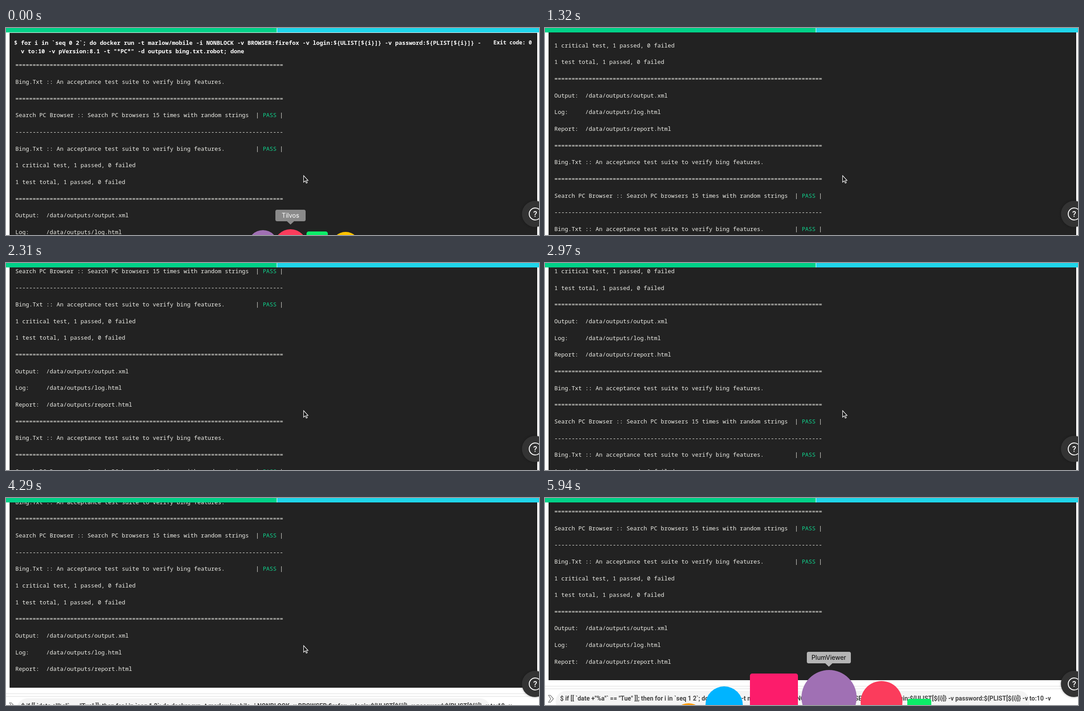
An HTML page with a canvas for the animation above (6.27 s loop, 1199x467 px).

```html
<!DOCTYPE html>
<html lang="en">
<head>
<meta charset="utf-8">
<title>Build log</title>
<style>
html, body { margin: 0; width: 100%; height: 100%; overflow: hidden; background: #fff; }
canvas { display: block; }
</style>
</head>
<body>
<canvas id="stage" width="1199" height="467"></canvas>
<script>
const ctx = document.getElementById('stage').getContext('2d');
const STEP = 330, STEPS = 19, PITCH = 37.66;
const MONO = '"Noto Sans Mono", "DejaVu Sans Mono", monospace';
const SANS = 'Roboto, "Open Sans", sans-serif';
const TIP = 'Inter, "Liberation Sans", sans-serif';

// Page offset at each step; the last value holds
const SCROLL = [0, 20, 101, 167, 270.6, 421, 535, 630.5, 668, 743, 820, 858.5, 930, 1016, 1032.6];

const RULE = '='.repeat(78);
const SUITE = 'Bing.Txt :: An acceptance test suite to verify bing features.';
const PASS = '| PASS |';
const RUN = [
  RULE, SUITE, RULE,
  'Search PC Browser :: Search PC browsers 15 times with random strings'.padEnd(70) + PASS,
  '-'.repeat(78),
  SUITE.padEnd(70) + PASS,
  '1 critical test, 1 passed, 0 failed',
  '1 test total, 1 passed, 0 failed',
  RULE,
  'Output:  /data/outputs/output.xml',
  'Log:     /data/outputs/log.html',
  'Report:  /data/outputs/report.html'
];
const LINES = [...RUN, ...RUN, ...RUN];
const ARGS = 'docker run -t marlow/mobile -i NONBLOCK -v BROWSER:firefox ' +
  '-v login:${ULIST[${i}]} -v password:${PLIST[${i}]} -';

// Dock items: shape, centre x, top, half width, colour
const DOCK_LOW = [
  ['circle', 578, 456, 34, '#a070b4'],
  ['circle', 640, 454, 37, '#fb3c5c'],
  ['square', 700, 459, 24, '#0cec68'],
  ['circle', 764, 460, 32, '#ffc200']
];
const DOCK_HIGH = [
  ['circle', 323, 463, 34, '#ff9d0a'],
  ['circle', 403, 425, 42, '#00b4ff'],
  ['square', 515, 396, 54, '#fc1c6b'],
  ['circle', 639, 388, 62, '#a070b4'],
  ['circle', 757, 413, 47, '#fb3c5c'],
  ['square', 842, 453, 27, '#0cec68']
];

function box(x, y, w, h, color) {
  ctx.fillStyle = color;
  ctx.fillRect(x, y, w, h);
}

function text(str, x, y, font, color, align = 'left') {
  ctx.font = font;
  ctx.fillStyle = color;
  ctx.textAlign = align;
  ctx.fillText(str, x, y);
}

function round(x, y, w, h, r, color) {
  ctx.fillStyle = color;
  ctx.beginPath();
  ctx.roundRect(x, y, w, h, r);
  ctx.fill();
}

function disc(x, y, r, color) {
  ctx.fillStyle = color;
  ctx.beginPath();
  ctx.arc(x, y, r, 0, 7);
  ctx.fill();
}

function page(scroll) {
  const at = y => Math.round(y - scroll);
  box(8, at(11), 1187, 1433, '#222');

  const bold = 'bold 12.885px ' + MONO;
  text('$ for i in `seq 0 2`; do ' + ARGS, 18, at(37.5), bold, '#fff');
  text('v to:10 -v pVersion:8.1 -t "*PC*" -d outputs bing.txt.robot; done', 33.5, at(56.5), bold, '#fff');
  text('Exit code: 0', 1183, at(37), 'bold 12px ' + MONO, '#fff', 'right');

  LINES.forEach((line, i) => {
    const y = at(88.3 + i * PITCH);
    if (y < 0 || y > 485) return;
    const font = '12.885px ' + MONO;
    text(line.replace('PASS', '    '), 21, y, font, '#eeeee8');
    if (line.endsWith(PASS)) text('PASS', 21 + 72 * 7.731, y, font, '#10d28c');
  });

  // Next command, below the log
  box(0, at(1457), 1199, 1, '#ddd');
  box(0, at(1463), 1199, 1, '#ddd');
  round(24, at(1468), 1066, 48, 24, '#f4f4f4');
  text('$ if [[ `date +"%a"` == "Tue" ]]; then for i in `seq 1 2`; do ' + ARGS + 'v to:10 -v',
    34, at(1490), 'bold 13.88px ' + SANS, '#444');
  ctx.save();
  ctx.translate(8, at(1477.5));
  ctx.strokeStyle = '#666';
  ctx.lineWidth = 1.2;
  ctx.stroke(new Path2D('M0 0H4L11 8L4 16H0L5 8Z'));
  ctx.restore();
}

function help() {
  ctx.save();
  ctx.shadowColor = 'rgba(0,0,0,.35)';
  ctx.shadowBlur = 5;
  disc(1190, 419.5, 29.5, '#333');
  ctx.restore();
  ctx.strokeStyle = '#fff';
  ctx.lineWidth = 2;
  ctx.beginPath();
  ctx.arc(1190.5, 419.5, 13.5, 0, 7);
  ctx.stroke();
  text('?', 1190.5, 426, '500 18px ' + SANS, '#fff', 'center');
}

function dock(items, drop = 0) {
  for (const [shape, x, top, r, color] of items) {
    if (shape === 'circle') disc(x, top + r + drop, r, color);
    else round(x - r, top + drop, 2 * r, 2 * r, 5, color);
  }
}

function tooltip(label, x, y, w, h, fill, color) {
  const mid = x + w / 2;
  round(x, y, w, h, 4, fill);
  ctx.beginPath();
  ctx.moveTo(mid - 8, y + h);
  ctx.lineTo(mid, y + h + 7.5);
  ctx.lineTo(mid + 8, y + h);
  ctx.fill();
  text(label, mid, y + h / 2 + 5, '14px ' + TIP, color, 'center');
}

function pointer(x, y) {
  ctx.save();
  ctx.translate(x, y);
  const arrow = new Path2D('M0 0V15L3.5 11.8L6 17L8.3 16L6 11H10Z');
  ctx.fillStyle = '#111';
  ctx.strokeStyle = '#fff';
  ctx.lineWidth = 1.2;
  ctx.fill(arrow);
  ctx.stroke(arrow);
  ctx.restore();
}

function draw(step) {
  box(0, 0, 1199, 467, '#fff');
  page(SCROLL[Math.min(step, SCROLL.length - 1)]);
  box(0, 0, 1199, 10, '#fff');
  box(0, 0, 609, 10, '#00d188');
  box(610, 0, 589, 10, '#1fd5ea');
  help();

  if (step < 15) pointer(669.5, 333);
  else if (step === 15) pointer(664, 383);

  if (step === 0) {
    dock(DOCK_LOW);
    tooltip('Tilvos', 606, 410, 68, 26, '#8a8a8a', '#fff');
  } else if (step === 16) {
    tooltip('Tilvos', 615, 428, 70, 28, '#e2e2e2', '#444');
  } else if (step > 16) {
    const drop = step === 17 ? 20 : 0;
    dock(DOCK_HIGH, drop);
    tooltip('PlumViewer', 589, 347 + drop, 99, 26, '#b5b5b5', '#000');
  }
}

const start = performance.now();
function tick() {
  draw(Math.floor((performance.now() - start) / STEP) % STEPS);
  requestAnimationFrame(tick);
}
tick();
</script>
</body>
</html>
```
